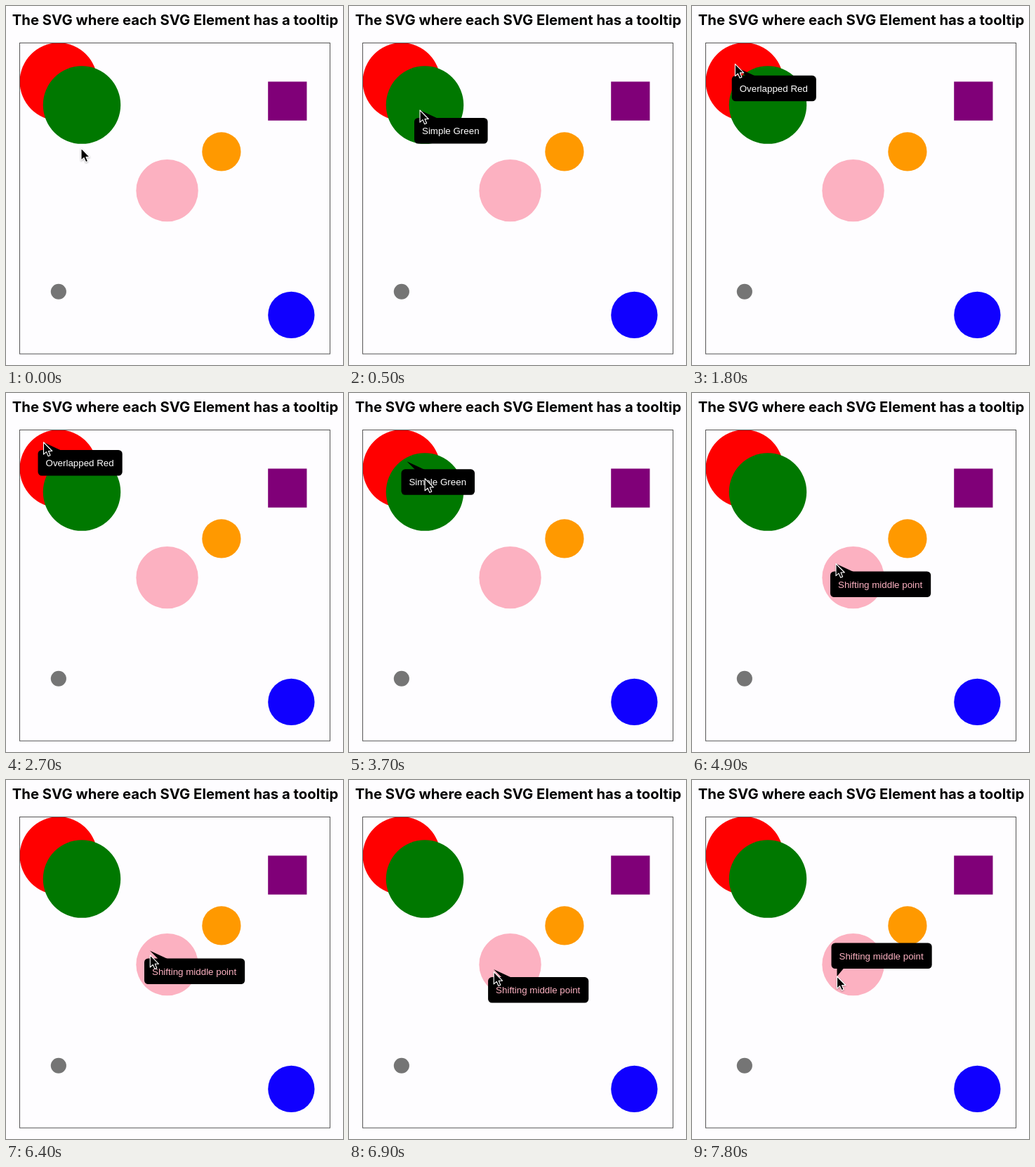
Recreate the animation shown at these times as an HTML page. Size 480 px wide and 510 px high, loop 8000 ms.

```html
<!DOCTYPE html>
<html lang="en">
<head>
<meta charset="utf-8">
<title>Tooltips</title>
<style>
  html, body { margin: 0; width: 100%; height: 100%; overflow: hidden; background: #fefdff; }
  svg { display: block; }
  .title { font: 700 20.3px Inter, sans-serif; text-anchor: middle; }
  .label { font: 13.35px "Liberation Sans", sans-serif; }
  #cursor { filter: drop-shadow(0 1px 1px rgba(0, 0, 0, .3)); }
</style>
</head>
<body>
<svg width="480" height="510" viewBox="0 0 480 510">
  <text class="title" x="241" y="27">The SVG where each SVG Element has a tooltip</text>
  <g transform="translate(19.6 52.2) scale(1.105)">
    <circle id="red" cx="50" cy="50" r="50" fill="#ff0000"/>
    <circle id="green" cx="80" cy="80" r="50" fill="#007800"/>
    <rect x="320" y="50" width="50" height="50" fill="#800078"/>
    <circle cx="260" cy="140" r="25" fill="#ff9900"/>
    <circle id="pink" cx="190" cy="190" r="40" fill="#fcb1c1"/>
    <circle cx="50" cy="320" r="10" fill="#757575"/>
    <circle cx="350" cy="350" r="30" fill="#1000ff"/>
  </g>
  <rect x="19.5" y="52.5" width="442" height="441.7" fill="none" stroke="#555"/>
  <g id="tip">
    <path id="tail"/>
    <rect id="box" x="-8" height="36.5" rx="5.5"/>
    <text id="label" class="label" x="3"></text>
  </g>
  <path id="cursor" d="M0 0V17.2L4 13.6L6.7 19.8L9.6 18.5L7 12.5H12.3Z"
        fill="#000" stroke="#fff" stroke-width="1.1" stroke-linejoin="round"/>
</svg>
<script>
const LOOP = 8000, STEP = 100, SCALE = 1.105, LEFT = 19.6, TOP = 52.2;
const MIDDLE = TOP + 200 * SCALE;
const $ = id => document.getElementById(id);
const tip = $('tip'), tail = $('tail'), box = $('box'), label = $('label'), cursor = $('cursor');

// Topmost first
const targets = [
  { shape: $('pink'), text: 'Shifting middle point', color: '#fcb1c1' },
  { shape: $('green'), text: 'Simple Green', color: '#fff' },
  { shape: $('red'), text: 'Overlapped Red', color: '#fff' }
];

// The pointer glides from stop to stop and rests in between
const start = { x: 107, y: 202 };
const glides = [
  { from: 0, to: 400, x: 101, y: 148 },
  { from: 1400, to: 1750, x: 63, y: 85 },
  { from: 1750, to: 2200, x: 53.5, y: 70 },
  { from: 3500, to: 4100, x: 168, y: 178 },
  { from: 4100, to: 4800, x: 205, y: 242.5 },
  { from: 6300, to: 7200, x: 206.5, y: 279 }
];

const easeOut = p => 1 - (1 - p) ** 1.6;

function pointAt(t) {
  let { x, y } = start;
  for (const g of glides) {
    const p = Math.min(1, Math.max(0, (t - g.from) / (g.to - g.from)));
    x += (g.x - x) * easeOut(p);
    y += (g.y - y) * easeOut(p);
  }
  return [x, y];
}

const move = (el, x, y) => el.setAttribute('transform', `translate(${x} ${y})`);

function covers(shape, x, y) {
  const [cx, cy, r] = ['cx', 'cy', 'r'].map(name => +shape.getAttribute(name));
  return Math.hypot((x - LEFT) / SCALE - cx, (y - TOP) / SCALE - cy) < r;
}

function showTip(x, y) {
  const hit = targets.find(c => covers(c.shape, x, y));
  tip.style.display = hit ? '' : 'none';
  if (!hit) return;
  const below = y < MIDDLE, top = below ? 11 : -47.5;
  if (label.textContent !== hit.text) label.textContent = hit.text;
  label.setAttribute('fill', hit.color);
  label.setAttribute('y', top + 23);
  box.setAttribute('y', top);
  box.setAttribute('width', label.getComputedTextLength() + 23);
  tail.setAttribute('d', below ? 'M0 0L12 12H26Z' : 'M0 0V-12H10Z');
  move(tip, x, y);
}

function draw(time) {
  const t = Math.floor((time % LOOP) / STEP) * STEP;
  move(cursor, ...pointAt(t));
  showTip(...pointAt(t - STEP)); // tooltip trails the pointer
}

function tick() {
  draw(performance.now());
  requestAnimationFrame(tick);
}
tick();
</script>
</body>
</html>
```
